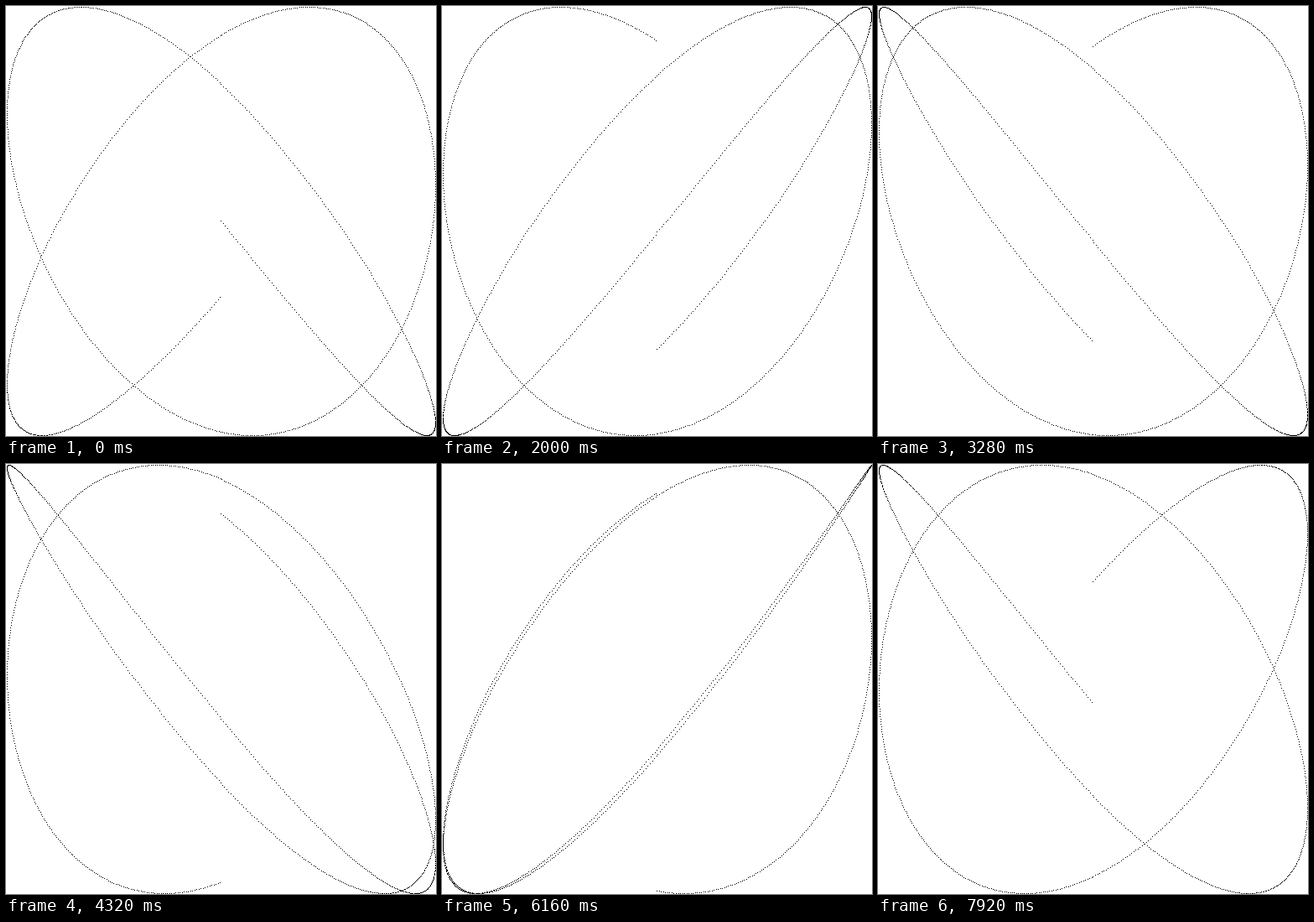
Write an HTML page with a canvas that moves like this. It is 513x513 px and loops after 8 s.

```html
<!DOCTYPE html>
<html lang="en">
<head>
<meta charset="utf-8">
<title>Lissajous</title>
<style>
  html, body { margin: 0; width: 100%; height: 100%; overflow: hidden; background: #fff; }
  canvas { display: block; width: 513px; height: 513px; image-rendering: pixelated; }
</style>
</head>
<body>
<canvas id="stage" width="513" height="513"></canvas>
<script>
const SIZE = 256;
const CYCLES = 2;
const RES = 0.01;
const FREQ = 1.22155;
const DELAY = 80;
const FRAMES = 100;

const ctx = document.getElementById('stage').getContext('2d');
const toPixel = v => SIZE + Math.trunc(v * SIZE + 0.5);

function draw(phase) {
  ctx.fillStyle = '#fff';
  ctx.fillRect(0, 0, 2 * SIZE + 1, 2 * SIZE + 1);
  ctx.fillStyle = '#000';
  for (let t = 0; t < CYCLES * 2 * Math.PI; t += RES) {
    ctx.fillRect(toPixel(Math.sin(t)), toPixel(Math.sin(t * FREQ + phase)), 1, 1);
  }
}

const start = performance.now();
let shown = -1;

function tick() {
  const step = Math.floor((performance.now() - start) / DELAY) % FRAMES;
  if (step !== shown) {
    shown = step;
    draw(step * 0.1);
  }
  requestAnimationFrame(tick);
}
tick();
</script>
</body>
</html>
```
